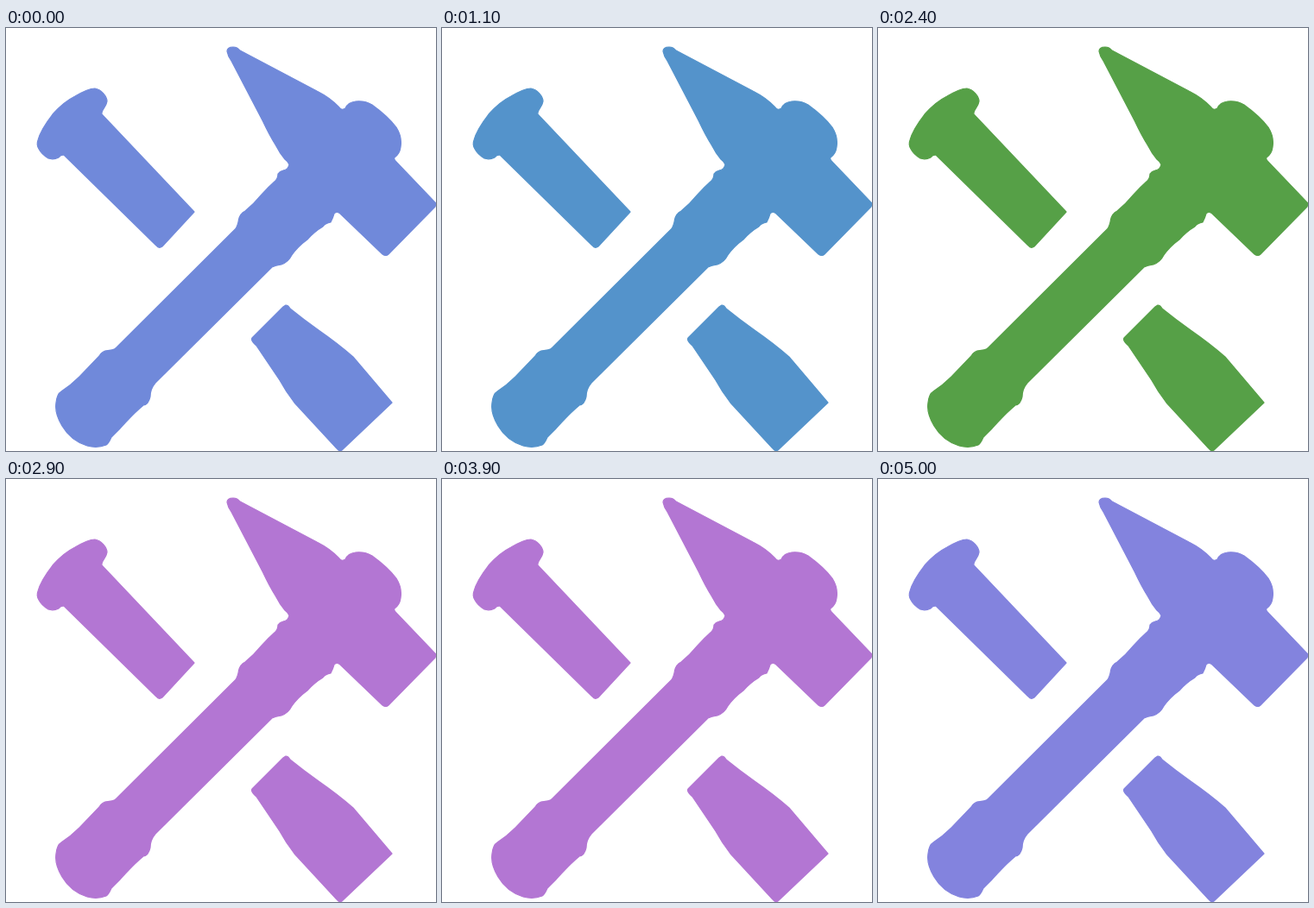
These frames come from a looping animation (498 px wide and 490 px high, 5050 ms). An HTML page without scripts:

```html
<!DOCTYPE html>
<html lang="en">
<head>
<meta charset="utf-8">
<title>Hammer and chisel</title>
<style>
  html, body {
    margin: 0;
    width: 100%;
    height: 100%;
    overflow: hidden;
    background: #fff;
  }

  /* 101 steps of 50 ms; the small delay keeps steps clear of rounding */
  svg {
    display: block;
    width: 498px;
    height: 490px;
    fill: #7089da;
    stroke: #7089da;
    stroke-width: 1.2;
    stroke-linejoin: round;
    animation: hue 5050ms -1ms infinite steps(9);
  }

  /* Percentages are calculated as step / 101 */
  @keyframes hue {
    0%       { filter: hue-rotate(0deg); animation-timing-function: steps(1); }
    0.9901%  { filter: hue-rotate(-4.2deg); animation-timing-function: steps(8); }
    8.9109%  { filter: hue-rotate(-142deg); }
    17.8218% { filter: hue-rotate(-312.6deg); animation-timing-function: steps(11); }
    28.7129% { filter: hue-rotate(-502deg); }
    37.6238% { filter: hue-rotate(-672.6deg); animation-timing-function: steps(11); }
    48.5149% { filter: hue-rotate(-862deg); }
    57.4257% { filter: hue-rotate(-1032.6deg); animation-timing-function: steps(11); }
    68.3168% { filter: hue-rotate(-1222deg); }
    77.2277% { filter: hue-rotate(-1392.6deg); animation-timing-function: steps(11); }
    88.1188% { filter: hue-rotate(-1582deg); }
    97.0297% { filter: hue-rotate(-1752.6deg); animation-timing-function: steps(3); }
    100%     { filter: hue-rotate(-1804.3deg); }
  }
</style>
</head>
<body>
<svg viewBox="0 0 498 490" xmlns="http://www.w3.org/2000/svg">
  <!-- chisel handle -->
  <path d="M103 70C110 71 117 79 117 85C116 92 110 95 111 100L218 213L181 253
    Q177 256 174 252L67 147Q63 147 61 150Q55 153 49 151Q41 146 38 140Q35 135 37 130
    Q40 118 54 100Q66 86 80 79Q95 70 103 70Z"/>
  <!-- chisel blade -->
  <path d="M324 321Q327 321 329 325Q345 338 362 350Q385 366 402 381L447 434L389 489
    Q386 491 383 487L334 434Q324 421 317 408L290 368Q283 362 285 359L321 323Z"/>
  <!-- hammer -->
  <path d="M256 27Q256 22 263 22Q268 22 271 26L360 73Q376 81 386 92Q389 96 393 93
    Q396 86 405 85Q416 84 424 89Q442 102 452 115Q459 126 457 138Q456 146 450 150
    Q449 152 451 154L498 203L497 207L443 262Q440 265 436 262L387 215Q383 212 380 215
    Q379 219 376 225Q370 226 367 230Q357 236 349 245Q338 253 331 263Q327 271 319 274
    Q312 275 308 277L173 411Q167 418 167 427Q165 436 159 437Q151 444 147 448
    Q140 455 131 465L122 474Q119 481 116 483Q106 487 94 484Q75 478 65 461
    Q56 446 58 434Q59 424 64 421Q75 414 85 404L108 380Q111 374 118 373.5
    Q125 373.5 127.5 370.5L265.5 233Q268.5 229 269.5 222Q271 215 277 212
    Q287 204 296 193Q304 184 312 177Q315 174 315 169Q317 166 321 165
    Q327 164 328 158Q327 155 323 152Q317 145 312.5 136Q305 124 297.5 108L261.5 39
    Q257 33 256 27Z"/>
</svg>
</body>
</html>
```
